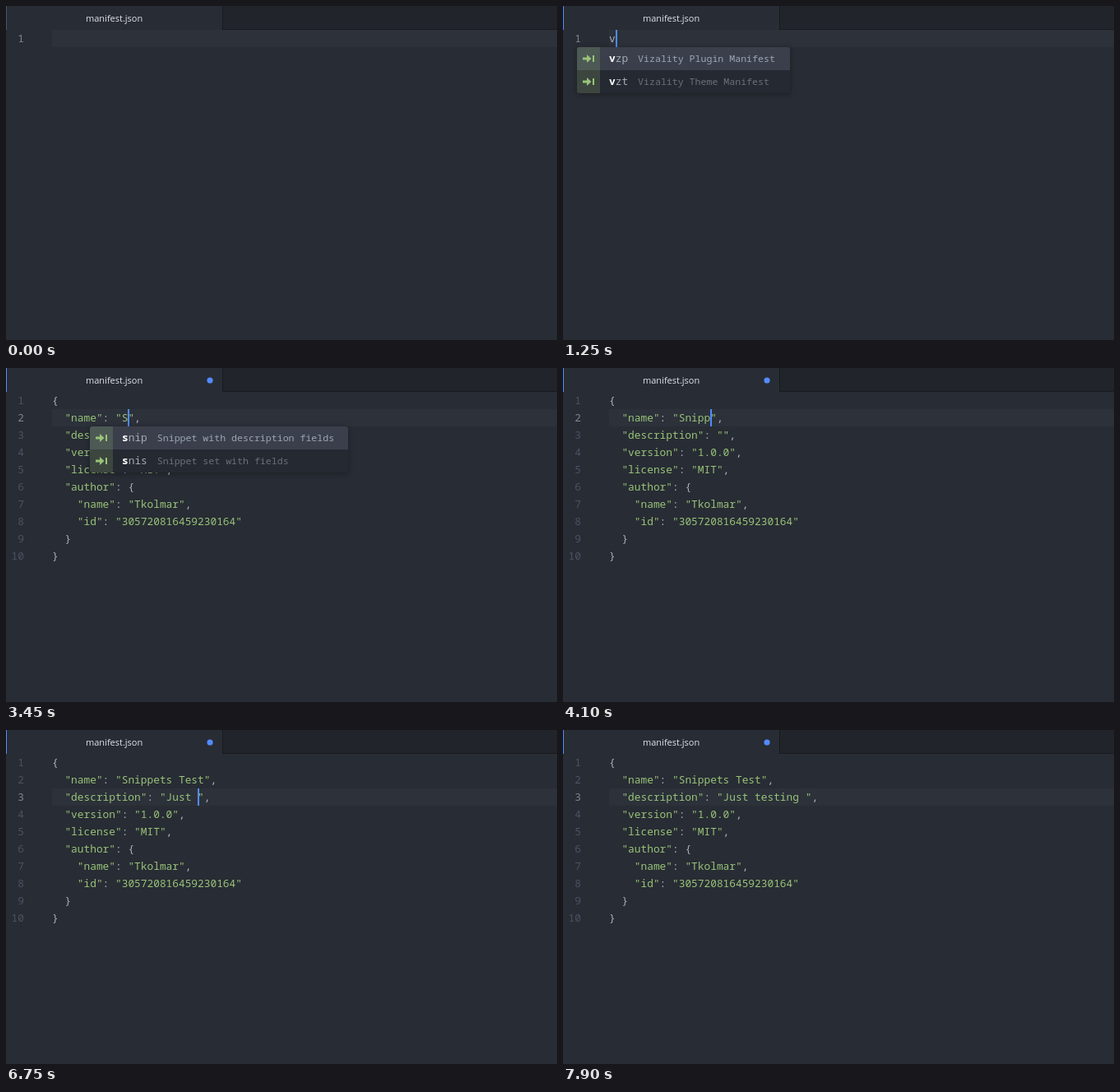
These frames come from a looping animation (670x406 px, 8 s). An HTML page with a canvas:

```html
<!DOCTYPE html>
<html lang="en">
<head>
<meta charset="utf-8">
<title>manifest.json</title>
<style>
  html, body { margin: 0; width: 100%; height: 100%; overflow: hidden; background: #282c34; }
  canvas { display: block; }
</style>
</head>
<body>
<canvas id="stage" width="670" height="406"></canvas>
<script>
const ctx = document.getElementById('stage').getContext('2d');
const LOOP = 8000, W = 670, H = 406;
const LEFT = 56, TOP = 29, LINE = 21, CHAR = 7.7, ROW = 28;
const MONO = '"Noto Sans Mono", "DejaVu Sans Mono", monospace';
const CODE = `12.83px ${MONO}`, BOLD = `bold 12.83px ${MONO}`, SMALL = `11.58px ${MONO}`;
const GREEN = '#98c379', PLAIN = '#abb2bf', BLUE = '#528bff';

// When each character is typed
const PREFIX = { text: 'vzp', at: [1250, 1350, 1500] };
const NAME = {
  text: 'Snippets Test',
  at: [3300, 3550, 3700, 3950, 4100, 4200, 4400, 4450, 4500, 5100, 5200, 5250, 5350]
};
const DESC = {
  text: 'Just testing ',
  at: [6350, 6450, 6500, 6600, 6700, 6950, 7050, 7200, 7300, 7500, 7550, 7550, 7600]
};
const FOCUS = 250, DIRTY = 1600, EXPAND = 2000, NEXT = 5750;
const CARET_OFF = [[0, FOCUS], [600, 900], [2300, 2600], [2950, 3300], [4800, 5100],
                   [5700, NEXT], [6000, 6350], [7900, LOOP]];

const within = (t, from, to) => t >= from && t < to;
const typed = (word, t) => word.text.slice(0, word.at.filter(at => at <= t).length);

function rect(x, y, w, h, color) {
  ctx.fillStyle = color;
  ctx.fillRect(x, y, w, h);
}

function write(str, x, y, color, font = CODE) {
  ctx.font = font;
  ctx.fillStyle = color;
  ctx.fillText(str, x, y);
}

function manifest(t) {
  return [
    '{',
    `  "name": "${typed(NAME, t)}",`,
    `  "description": "${typed(DESC, t)}",`,
    '  "version": "1.0.0",',
    '  "license": "MIT",',
    '  "author": {',
    '    "name": "Tkolmar",',
    '    "id": "305720816459230164"',
    '  }',
    '}'
  ];
}

function drawTabs(t) {
  rect(0, 0, W, TOP, '#21252b');
  rect(263, 0, 1, TOP, '#181a1f');
  rect(263, 28, W - 263, 1, '#181a1f');
  rect(0, 0, 263, TOP, '#282c34');
  rect(0, 0, 1, TOP, t < FOCUS ? '#4b5263' : BLUE);
  write('manifest.json', 97, 19, '#e2e5ea', '11px "Open Sans", "Noto Sans", sans-serif');
  if (t >= DIRTY) {
    ctx.fillStyle = BLUE;
    ctx.beginPath();
    ctx.arc(248, 15, 3.6, 0, 7);
    ctx.fill();
  }
}

function drawCode(lines, active) {
  rect(LEFT, TOP + active * LINE, W - LEFT, LINE, '#2c313a');
  lines.forEach((line, i) => {
    const y = TOP + i * LINE + 15, num = String(i + 1);
    write(num, 22 - num.length * CHAR, y, i === active ? '#7d8491' : '#4b5263');
    let col = 0;
    for (const part of line.match(/"[^"]*"|[^"]+/g) || []) {
      write(part, LEFT + col * CHAR, y, part[0] === '"' ? GREEN : PLAIN);
      col += part.length;
    }
  });
}

function drawIcon(x, y) {
  ctx.fillStyle = GREEN;
  ctx.beginPath();
  ctx.moveTo(x - 7, y - 1.5);
  ctx.lineTo(x - 2, y - 1.5);
  ctx.lineTo(x - 2, y - 5);
  ctx.lineTo(x + 3.5, y);
  ctx.lineTo(x - 2, y + 5);
  ctx.lineTo(x - 2, y + 1.5);
  ctx.lineTo(x - 7, y + 1.5);
  ctx.fill();
  ctx.fillRect(x + 5, y - 4, 2, 8);
}

// Suggestion list; each item is [label, description]
function drawPopup(x, y, w, items, match, icons) {
  const h = items.length * ROW;
  ctx.save();
  ctx.beginPath();
  ctx.roundRect(x, y, w, h, 3);
  if (icons) {
    ctx.shadowColor = 'rgba(0,0,0,.35)';
    ctx.shadowBlur = 6;
    ctx.shadowOffsetY = 1;
  }
  ctx.fillStyle = '#252932';
  ctx.fill();
  ctx.shadowColor = 'transparent';
  ctx.clip();
  items.forEach(([label, info], i) => {
    const top = y + i * ROW, base = top + 18;
    if (!i) rect(x, top, w, ROW, '#3a3f4b');
    let tx = x + 8;
    if (icons) {
      rect(x, top, ROW, ROW, i ? '#3c463f' : '#4d5954');
      drawIcon(x + 14, top + 14);
      tx = x + 39;
    }
    write(label.slice(0, match), tx, base, '#fff', BOLD);
    write(label.slice(match), tx + match * CHAR, base, '#a5acb8');
    if (info) write(info, tx + label.length * CHAR + 12, base, i ? '#6a707b' : '#9da5b4', SMALL);
  });
  ctx.restore();
}

function drawPopups(t) {
  if (within(t, 1250, EXPAND)) {
    const items = [['vzp', 'Vizality Plugin Manifest'], ['vzt', 'Vizality Theme Manifest']];
    drawPopup(17, 50, 259, t < 1550 ? items : items.slice(0, 1), typed(PREFIX, t).length, true);
  }
  if (within(t, 3400, 3800)) {
    const items = [['snip', 'Snippet with description fields'], ['snis', 'Snippet set with fields']];
    drawPopup(102, 71, 314, items, typed(NAME, t).length, true);
  }
  if (within(t, 7100, 7500)) {
    drawPopup(225, 92, 243, [['Test']], typed(DESC, t).length - 5, false);
  }
}

function drawCaret(t, active) {
  if (CARET_OFF.some(([from, to]) => within(t, from, to))) return;
  let col = typed(PREFIX, t).length;
  if (t >= EXPAND) col = active === 1 ? 11 + typed(NAME, t).length : 18 + typed(DESC, t).length;
  rect(Math.round(LEFT + col * CHAR), TOP + active * LINE, 2, LINE, BLUE);
}

// The text pointer comes in from the left, clicks and leaves again
function drawPointer(t) {
  if (!within(t, 50, 500)) return;
  const p = Math.sin((t - 50) / 450 * Math.PI);
  const x = Math.round(-4 + 90 * p), y = Math.round(334 - 14 * p);
  rect(x, y, 1, 17, '#c8ccd4');
  rect(x - 3, y, 7, 1, '#c8ccd4');
  rect(x - 3, y + 16, 7, 1, '#c8ccd4');
}

function draw(t) {
  rect(0, 0, W, H, '#282c34');
  const active = t < EXPAND ? 0 : t < NEXT ? 1 : 2;
  drawTabs(t);
  drawCode(t < EXPAND ? [typed(PREFIX, t)] : manifest(t), active);
  drawCaret(t, active);
  drawPopups(t);
  drawPointer(t);
}

const start = performance.now();
function tick() {
  draw((performance.now() - start) % LOOP);
  requestAnimationFrame(tick);
}
tick();
</script>
</body>
</html>
```
